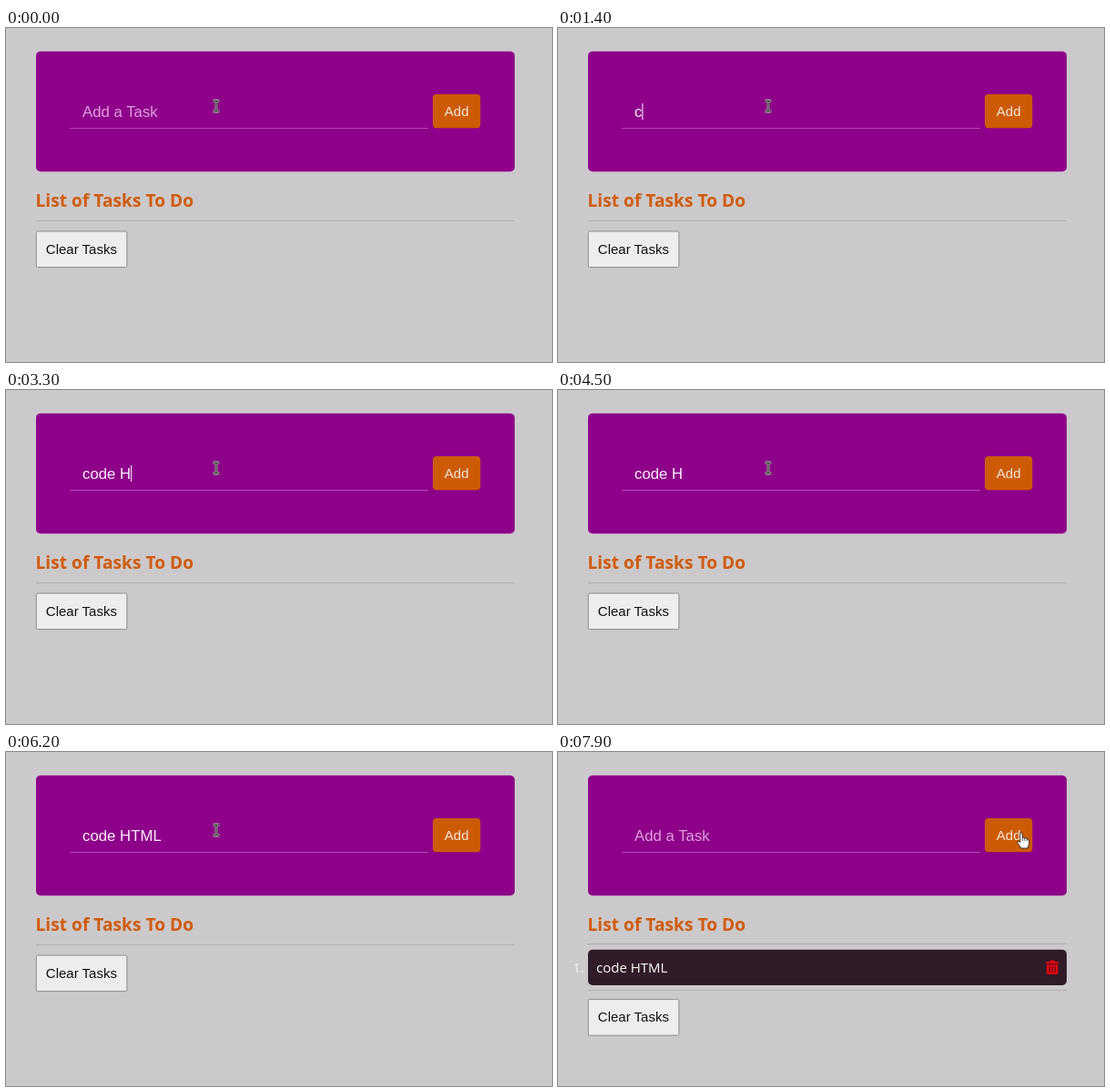
Recreate the animation shown at these times as an HTML page. Size 600 px wide and 368 px high, loop 8000 ms.

```html
<!DOCTYPE html>
<html lang="en">
<head>
<meta charset="utf-8">
<title>Task list</title>
<style>
  html, body { margin: 0; width: 100%; height: 100%; overflow: hidden; background: #cbc9cb; }
  svg { display: block; width: 600px; height: 368px; }
  text { white-space: pre; font-family: "Liberation Sans", Arial, sans-serif; font-size: 15px; }
  .open { font-family: "Open Sans", sans-serif; }
  #field { font-size: 16.8px; }
</style>
</head>
<body>
<svg viewBox="0 0 600 368">
  <rect width="600" height="368" fill="#cbc9cb"/>
  <rect x="33" y="25.7" width="526" height="132.5" rx="5" fill="#8e008a"/>
  <path d="M70 110.5H464" stroke="#b748b5"/>
  <text id="field" x="84" y="97.5"></text>
  <rect id="caret" y="83" width="1" height="18" fill="#fff"/>
  <rect x="469" y="73" width="52.3" height="37.3" rx="4" fill="#cd5b05"/>
  <text x="481.8" y="97" fill="#f3e6df">Add</text>

  <text class="open" x="32.5" y="197" fill="#d05a08" style="font-size:19.2px;font-weight:700">List of Tasks To Do</text>
  <path id="rule" d="M33 212.5H559" stroke="#b1afb1"/>

  <g id="task">
    <text class="open" x="16.3" y="243" fill="#f4f2f4">1.</text>
    <rect x="33" y="217.7" width="526" height="39.3" rx="5" fill="#301c28"/>
    <text class="open" x="42" y="243" fill="#fff">code HTML</text>
    <g fill="#e3000f">
      <path d="M536 231h4.2l1-1.4h4l1 1.4h4v2.2H536z"/>
      <path d="M537 234.2h12.4v9.2q0 1.6-1.6 1.6h-9.2q-1.6 0-1.6-1.6z"/>
    </g>
    <path d="M540.2 236.3v6.5M543.2 236.3v6.5M546.2 236.3v6.5" stroke="#301c28" stroke-width=".9"/>
    <path d="M33 262.5H559" stroke="#b1afb1"/>
  </g>

  <g id="clear">
    <rect x="33.3" y="224" width="99.6" height="39.6" rx="1.5" fill="#ededed" stroke="#8d8b8d"/>
    <text x="43.8" y="248.5" fill="#111">Clear Tasks</text>
  </g>

  <g id="beam" fill="none">
    <path d="M-3.5-6H-1L0-5 1-6H3.5M0-5V5M-3.5 6H-1L0 5 1 6H3.5" stroke="#a9b8a4" stroke-width="2.8"/>
    <path d="M-3.5-6H-1L0-5 1-6H3.5M0-5V5M-3.5 6H-1L0 5 1 6H3.5" stroke="#222"/>
  </g>
  <path id="arrow" d="M0-7V6L3 3.2 5 8 7 7.1 5 2.5H9.2z" fill="#fff" stroke="#222" stroke-width=".8"/>
  <g id="hand">
    <path d="M-3.2-7.2Q-1.8-9-.6-7.2V-2.4Q.7-3.4 1.9-2 3.2-2.8 4.3-1.3 6.6-1.6 6.7.8V4.3L5.2 9H-2L-6 3.2Q-6.5 1.2-4.8 1.2L-3.2 2.6z"
      fill="#fff" stroke="#222" stroke-width=".9" stroke-linejoin="round"/>
    <path d="M-.6-2.4V1M1.9-2V1.2M4.3-1.3V1.4" fill="none" stroke="#222" stroke-width=".7"/>
  </g>
</svg>
<script>
const LOOP = 8000, STEP = 100, BLINK = 500;
const FOCUS = 600, MOVE_START = 6500, MOVE_END = 7200, ADD = 7600;
const TASK = "code HTML";
const KEY_TIMES = [1300, 1600, 1800, 2100, 2500, 2900, 4800, 5200, 5600];

const el = id => document.getElementById(id);
const show = (id, on) => el(id).setAttribute("display", on ? "inline" : "none");
const mix = (a, b, k) => a + (b - a) * k;

function drawField(t) {
  const added = t >= ADD;
  const count = added ? 0 : KEY_TIMES.filter(k => k <= t).length;
  const field = el("field");
  field.textContent = count ? TASK.slice(0, count) : "Add a Task";
  field.setAttribute("fill", count ? "#fbeefb" : "#dda0db");

  const lastInput = count ? KEY_TIMES[count - 1] : FOCUS;
  const lit = Math.floor((t - lastInput) / BLINK) % 2 === 0;
  show("caret", t >= FOCUS && !added && lit);
  el("caret").setAttribute("x", 84 + (count ? field.getComputedTextLength() : 0));
}

function drawPointer(t) {
  const p = Math.min(1, Math.max(0, (t - MOVE_START) / (MOVE_END - MOVE_START)));
  const k = p * p * (3 - 2 * p);
  const x = mix(231, 511, k), y = mix(86, 97, k);
  const active = x < 464 ? "beam" : x < 469 ? "arrow" : "hand";
  for (const id of ["beam", "arrow", "hand"]) show(id, id === active);
  el(active).setAttribute("transform", `translate(${x} ${y})`);
}

function draw(t) {
  const added = t >= ADD;
  drawField(t);
  drawPointer(t);
  show("task", added);
  el("clear").setAttribute("transform", `translate(0 ${added ? 48.6 : 0})`);
  el("rule").setAttribute("transform", `translate(0 ${added ? -1 : 0})`);
}

const start = performance.now();
function tick() {
  const t = (performance.now() - start) % LOOP;
  draw(Math.floor(t / STEP) * STEP);
  requestAnimationFrame(tick);
}
tick();
</script>
</body>
</html>
```
